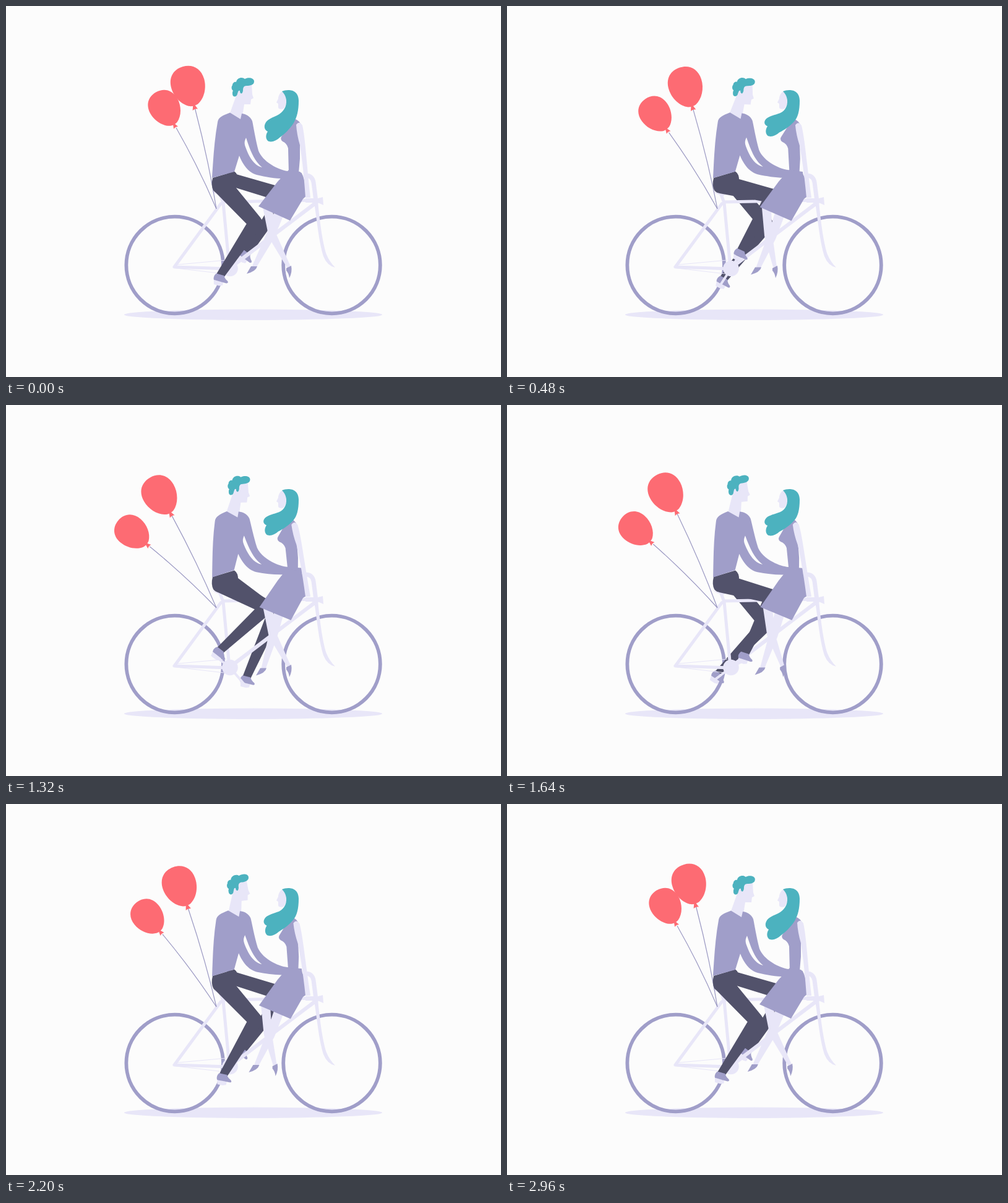
Write an HTML page that moves like this. It is 800x600 px and loops after 3 s.

```html
<!DOCTYPE html>
<html lang="en">
<head>
<meta charset="utf-8">
<title>Bicycle ride</title>
<style>
  html, body { margin: 0; width: 100%; height: 100%; overflow: hidden; background: #fcfcfc; }
  svg { display: block; width: 800px; height: 600px; }
  .pale { fill: #e8e6f8; }
  .cloth { fill: #a09ec9; }
  .dark { fill: #52526b; }
  .teal { fill: #4cb2bf; }
  .coral { fill: #fd6b73; }
  .line { fill: none; stroke: #e8e6f8; stroke-width: 5; stroke-linecap: round; stroke-linejoin: round; }
  .string { fill: none; stroke: #9a98c2; stroke-width: 1.2; }
</style>
</head>
<body>
<svg viewBox="0 0 800 600">
  <defs>
    <g id="balloon" class="coral">
      <path d="M-6 0C-17-5-25-19-25-33C-25-50-14-59 0-59C14-59 25-50 25-33C25-19 17-5 6 0Q0 2-6 0Z"/>
      <path d="M-1-1L-4 7Q0 5 4 7L1-1Z"/>
    </g>
    <g id="shoe">
      <path class="pale" d="M-8 9H8V14L3 16H-6Z"/>
      <path class="cloth" d="M-7-2H6Q9 3 14 5Q17 8 13 9H-8Q-11 4-7-2Z"/>
    </g>
  </defs>

  <ellipse class="pale" cx="399.5" cy="499.2" rx="208.5" ry="8.7"/>
  <g id="wheels" fill="none" stroke="#a09ec9" stroke-width="5.8">
    <circle cx="272.7" cy="419" r="78.3"/>
    <circle cx="526.5" cy="419" r="78.3"/>
  </g>

  <g id="farLeg"><path class="dark"/><use href="#shoe"/></g>

  <g id="bike">
    <path class="line" d="M344 300L351 318L361 424M350 317L500 314M347 320L272 422L360 425"/>
    <path class="line" style="stroke-width:6" d="M500 319L368 419"/>
    <path class="line" style="stroke-width:1" d="M275 418.500L356 411M275 424L352 433"/>
    <path class="line" style="stroke-width:7" d="M484 274Q495 274 497 285L501 316"/>
    <path class="pale" d="M332 298Q342 306 353 302L351 307Q338 306 332 298Z"/>
    <path class="pale" d="M497 312L504 316C507 350 512 385 518 402Q523 414 532 423Q519 420 513 405C505 380 502 340 497 312Z"/>
    <path class="pale" d="M484 311H504L512 309L513 322L504 318H484Z"/>
    <circle class="pale" cx="500" cy="316" r="5.500"/>
    <circle class="pale" cx="362" cy="424.500" r="12.800"/>
    <path class="line" id="crank" style="stroke-width:4"/>
  </g>

  <g id="lowBalloon">
    <path class="string" d="M275 197Q312 262 340 328"/>
    <use href="#balloon" transform="translate(271.200 190.800) rotate(-29)"/>
  </g>
  <g id="highBalloon">
    <path class="string" d="M305.500 166Q327 248 340 328"/>
    <use href="#balloon" transform="translate(303.700 160.300) rotate(-16) scale(1.100)"/>
  </g>

  <g id="nearLeg"><path class="dark"/><use href="#shoe"/></g>
  <path class="dark" d="M334 278L369 267.500Q376 272 375 284L351 302Q340 305 335 298Q331 290 334 278Z"/>

  <g id="man">
    <g id="manHead">
      <path class="pale" d="M374 130L371 148L361 176L379 190L383 172L385 159H395L396 151L400 149L398 143L397 125L380 124Z"/>
      <path class="teal" d="M366 128C366 124 370 122 372 123C373 116 382 114 386 118C391 115 401 116 401 122C401 128 394 129 389 129C384 129 383 132 383 137Q382 142 380 141.500Q378 141 378 137C375 136 375 140 374 142C373 148 366 148 366 142C366 140 366 138 367 137C364 135 364 130 366 128Z"/>
    </g>
    <path class="cloth" fill-rule="evenodd" d="M362 172.500C350 177 343 180 342 188C337 215 335 245 333 278L369 268L377 242C385 262 395 270 405 273C422 277 440 280 455 279L479 279L478 270L455 267C440 265 415 252 408 234C403 215 400 195 398 186C395 178 386 174 381 174L379 183ZM388 213C385 219 385 222 387 228C392 242 400 258 414 261C402 251 396 238 388 213Z"/>
  </g>

  <path class="pale" id="legs"/>
  <path class="cloth" id="shoeA" d="M-5-1L5-1Q3 7-12 11Z"/>
  <path class="cloth" id="shoeB" d="M-4 2L4-2Q6 8 1 18Q0 10-4 6Z"/>
  <g id="woman">
    <path class="cloth" d="M465 182Q476 185 478 196L475 225V247L473 270L457 270L456 230Q454 222 447 219Q442 215 446 210Z"/>
  </g>
  <path class="cloth" id="skirt"/>
  <path class="pale" id="arm" d="M469 192Q474 185 479 193C484 215 486 260 492 310H484C482 280 479 250 475 225Q470 208 469 192Z"/>
  <path class="pale" d="M447 138C441 141 440 148 440 150L437 156L440 158V164Q441 168 449 166L456 152Z"/>
  <path class="teal" id="hair"/>
</svg>

<script>
const LOOP = 3000;
const TIMES = [0, 480, 920, 1320, 1960, 2480, 3000];
// One value per key time; each curve closes on its first value.
const POSES = {
  low:   [0, -6, -15.7, -21, -14.6, -4.9],
  high:  [0, -1.65, -8.05, -13.75, -6.9, -1.15],
  lean:  [0, -0.9, -2.2, -2.9, -2.3, -0.8],
  nod:   [0, 2.7, 5.4, 1.6, -6.8, -2.5],
  bend:  [0, -1.8, -3.6, -4.6, -3.6, -1.6],
  hair:  [0, 1, 1.08, 1, 0.85, 0.55],
  footA: [401, 406, 414, 416, 408, 401],
  footB: [457, 433, 435, 457, 432, 443]
};
const SPIN = [[0, 216], [480, 395], [920, 535], [1320, 683], [1960, 868], [2120, 915], [2300, 936], [3000, 936]];

const $ = id => document.getElementById(id);
const rad = d => d * Math.PI / 180;
const pt = (x, y) => x.toFixed(2) + ' ' + y.toFixed(2);
const turn = (id, a, x, y) => $(id).setAttribute('transform', `rotate(${a} ${x} ${y})`);
const place = (el, x, y, a = 0) => el.setAttribute('transform', `translate(${x} ${y}) rotate(${a})`);
const draw = (id, d) => $(id).setAttribute('d', d);

// Smooth periodic curve through the key poses
function pose(name, t) {
  const v = POSES[name], n = v.length;
  const val = i => v[(i + n) % n];
  const time = i => i < 0 ? TIMES[i + n] - LOOP : i > n ? TIMES[i - n] + LOOP : TIMES[i];
  const slope = i => (val(i + 1) - val(i - 1)) / (time(i + 1) - time(i - 1));
  let i = 0;
  while (t >= TIMES[i + 1]) i++;
  const h = TIMES[i + 1] - TIMES[i], u = (t - TIMES[i]) / h, w = 1 - u;
  return (1 + 2 * u) * w * w * val(i) + u * w * w * h * slope(i)
    + u * u * (3 - 2 * u) * val(i + 1) - u * u * w * h * slope(i + 1);
}

function crankAngle(t) {
  const i = SPIN.findIndex(k => k[0] > t);
  const [t0, a0] = SPIN[i - 1], [t1, a1] = SPIN[i];
  return a0 + (a1 - a0) * (t - t0) / (t1 - t0);
}

// Tapered segment between two joints
function limb(a, b, wa, wb) {
  const len = Math.hypot(b.x - a.x, b.y - a.y);
  const nx = -(b.y - a.y) / len / 2, ny = (b.x - a.x) / len / 2;
  return 'M' + pt(a.x + nx * wa, a.y + ny * wa) + 'L' + pt(b.x + nx * wb, b.y + ny * wb)
    + 'L' + pt(b.x - nx * wb, b.y - ny * wb) + 'L' + pt(a.x - nx * wa, a.y - ny * wa) + 'Z';
}

// Joint cap, wound the same way as limb()
const disc = (c, r) => `M${pt(c.x + r, c.y)}A${r} ${r} 0 1 0 ${pt(c.x - r, c.y)}A${r} ${r} 0 1 0 ${pt(c.x + r, c.y)}Z`;

function knee(hip, ankle, thigh, shin) {
  const dx = ankle.x - hip.x, dy = ankle.y - hip.y, d = Math.hypot(dx, dy);
  const a = Math.atan2(dy, dx) - Math.acos((thigh * thigh + d * d - shin * shin) / (2 * thigh * d));
  return { x: hip.x + thigh * Math.cos(a), y: hip.y + thigh * Math.sin(a) };
}

function pedalLeg(id, angle, o) {
  const a = rad(angle);
  const ankle = { x: o.cx + o.rx * Math.sin(a), y: o.cy - o.ry * Math.cos(a) };
  const k = knee(o.hip, ankle, o.thigh, o.shin);
  const [path, shoe] = $(id).children;
  path.setAttribute('d', limb(o.hip, k, o.w, 23) + disc(k, 11.3) + limb(k, ankle, 23, 13));
  const tilt = o.tilt - 18 * Math.cos(rad(angle - 140));
  place(shoe, ankle.x, ankle.y, tilt);
  return { x: ankle.x - 12 * Math.sin(rad(tilt)), y: ankle.y + 12 * Math.cos(rad(tilt)) };
}

const NEAR = { hip: { x: 347, y: 288 }, thigh: 84, shin: 103, w: 31, cx: 362, cy: 416.5, rx: 27, ry: 24.5, tilt: 20 };
const FAR = { hip: { x: 355, y: 278 }, thigh: 99, shin: 112, w: 21, cx: 369, cy: 420.5, rx: 33, ry: 25.5, tilt: 32 };

function womanLegs(t) {
  const a = { x: pose('footA', t), y: 0 }, b = { x: pose('footB', t), y: 422 };
  a.y = 422 + (a.x - 401) * 0.3;
  const topA = { x: 441, y: 336 }, topB = { x: 422, y: 322 };
  topB.x = 422 + (b.x - 457) * 0.12;
  const kneeA = { x: 426 + (a.x - 401) * 0.35, y: 374 };
  const kneeB = { x: 431 + (b.x - 457) * 0.35, y: 372 };
  draw('legs', limb(topB, kneeB, 15, 13) + disc(kneeB, 6.3) + limb(kneeB, b, 13, 6)
    + limb(topA, kneeA, 16, 14) + disc(kneeA, 6.8) + limb(kneeA, a, 14, 7));
  place($('shoeA'), a.x, a.y);
  place($('shoeB'), b.x, b.y);
}

function hair(h) {
  const p = (x, y, k = 1) => pt(x - 2 * h * k, y - 8.5 * h * k) + ' ';
  draw('hair', 'M446 138C455 134 473 134 473 153C473 170 470 180 ' + p(465, 189, 0.3)
    + 'C' + p(458, 200, 0.6) + p(450, 207, 0.8) + p(442, 213)
    + 'C' + p(437, 218) + p(428, 221.5) + p(423, 218)
    + 'C' + p(419, 214) + p(420, 207) + p(423, 203)
    + 'C' + p(418, 201) + p(416.5, 195, 0.8) + p(419, 190, 0.7)
    + 'C' + p(422, 183, 0.5) + p(431, 180.5, 0.4) + p(438, 177, 0.3)
    + 'C448 172 454 163 453 152C452 145 449 141 446 138Z');
}

function render(t) {
  turn('lowBalloon', pose('low', t), 340, 328);
  turn('highBalloon', pose('high', t), 340, 328);

  const angle = crankAngle(t);
  const near = pedalLeg('nearLeg', angle, NEAR);
  const far = pedalLeg('farLeg', angle + 180, FAR);
  draw('crank', `M${pt(near.x, near.y)}L362 424.5L${pt(far.x, far.y)}`);

  turn('man', pose('lean', t), 350, 275);
  turn('manHead', pose('nod', t), 372, 168);

  const bend = pose('bend', t), s = -bend / 4.6;
  turn('woman', bend, 472, 285);
  turn('arm', bend * 0.82, 488, 310);
  draw('skirt', `M${pt(457 - 3 * s, 265)}L${pt(475 - 2 * s, 268)}Q${pt(484 + s, 274)} ${pt(484.5 + 2 * s, 308)}`
    + `L480 312L${pt(459 + 1.5 * s, 347 + s)}L${pt(408 + 1.5 * s, 324 + 3 * s)}L439 284Z`);
  womanLegs(t);
  hair(pose('hair', t));

  const bump = t > 2280 && t < 2680 ? -Math.sin((t - 2280) / 400 * Math.PI) : 0;
  place($('wheels'), 0, bump);
}

const start = performance.now();
function tick() {
  render((performance.now() - start) % LOOP);
  requestAnimationFrame(tick);
}
tick();
</script>
</body>
</html>
```
